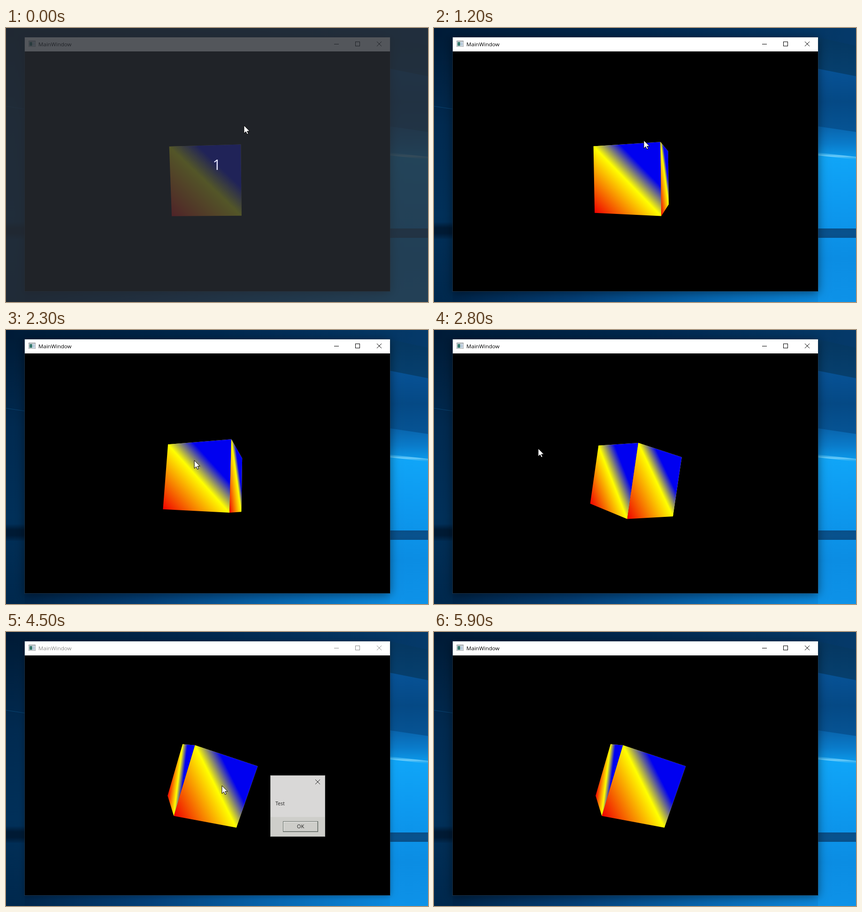
Animation, 899 px wide and 585 px high, one loop 6.2 s. Source, as an HTML page with a canvas:

```html
<!DOCTYPE html>
<html lang="en">
<head>
<meta charset="utf-8">
<title>Rotating cube</title>
<style>
html, body { margin: 0; width: 100%; height: 100%; overflow: hidden; background: #000; }
canvas { display: block; width: 100%; height: 100%; }
</style>
</head>
<body>
<canvas id="stage" width="899" height="585"></canvas>
<script>
const ctx = document.getElementById('stage').getContext('2d');
const W = 899, H = 585, LOOP = 6200, STEP = 100;
const FONT = '"Open Sans", "Noto Sans", sans-serif';

const clamp = v => Math.max(0, Math.min(1, v));
const mix = (a, b, p) => a + (b - a) * p;

// Smooth curve through a few key points that never overshoots them
function curve(keys, t) {
  const last = keys.length - 1;
  const i = Math.max(0, Math.min(last - 1, keys.findIndex(k => k.at > t) - 1));
  if (t >= keys[last].at) return keys[last].to;
  const slope = (j, c) => (keys[j + 1].to[c] - keys[j].to[c]) / (keys[j + 1].at - keys[j].at);
  const tangent = (j, c) => {
    if (j === 0 || j === last) return 0;
    const a = slope(j - 1, c), b = slope(j, c);
    return a * b > 0 ? 2 * a * b / (a + b) : 0;
  };
  const a = keys[i], b = keys[i + 1], d = b.at - a.at, p = (t - a.at) / d, q = 1 - p;
  return a.to.map((v, c) => v * q * q * (1 + 2 * p) + b.to[c] * p * p * (3 - 2 * p)
    + d * p * q * (tangent(i, c) * q - tangent(i + 1, c) * p));
}

// yaw, pitch, roll in degrees
const POSES = [
  { at: 0, to: [-3.2, 4, 1.3] },
  { at: 600, to: [-4, 7.5, .8] },
  { at: 1200, to: [-16, 1, .8] },
  { at: 1800, to: [0, -13.7, 2] },
  { at: 2800, to: [-47.7, .8, -8.3] },
  { at: 3500, to: [-67, 10, -10.7] },
  { at: 3700, to: [-70.2, 7, -17.5] }
];
const POINTER = [
  { at: 0, to: [507, 208] },
  { at: 600, to: [506, 197] },
  { at: 1200, to: [447, 240] },
  { at: 1800, to: [524, 289] },
  { at: 2800, to: [222, 253] },
  { at: 3200, to: [150, 184] },
  { at: 3500, to: [117, 236] },
  { at: 4300, to: [460, 328] },
  { at: 4500, to: [460, 328] },
  { at: 5000, to: [626, 410] }
];

function polygon(points, fill) {
  ctx.beginPath();
  points.forEach(p => ctx.lineTo(p[0], p[1]));
  ctx.closePath();
  ctx.fillStyle = fill;
  ctx.fill();
}

function rect(x, y, w, h, fill) {
  ctx.fillStyle = fill;
  ctx.fillRect(x, y, w, h);
}

function frame(x, y, w, h, color) {
  ctx.strokeStyle = color;
  ctx.lineWidth = 1;
  ctx.strokeRect(x + .5, y + .5, w - 1, h - 1);
}

// Evenly spaced colours from one point to another
function gradient(x0, y0, x1, y1, ...colors) {
  const g = ctx.createLinearGradient(x0, y0, x1, y1);
  colors.forEach((color, i) => g.addColorStop(i / (colors.length - 1), color));
  return g;
}

function line(x0, y0, x1, y1, color) {
  ctx.strokeStyle = color;
  ctx.lineWidth = 1;
  ctx.beginPath();
  ctx.moveTo(x0, y0);
  ctx.lineTo(x1, y1);
  ctx.stroke();
}

function cross(x, y, size, color) {
  line(x, y, x + size, y + size, color);
  line(x + size, y, x, y + size, color);
}

function text(str, x, y, size, color, align = 'left') {
  ctx.font = `${size}px ${FONT}`;
  ctx.textAlign = align;
  ctx.fillStyle = color;
  ctx.fillText(str, x, y);
}

// Slanted band across the right edge of the desktop
function ray(top, bottom, drop, ...colors) {
  polygon([[818, top], [W, top + drop], [W, bottom + drop], [818, bottom]],
    gradient(0, top, 0, bottom + drop, ...colors));
}

function drawWallpaper() {
  rect(0, 0, W, H, gradient(0, 0, W, 0, '#001b37', '#00284f', '#053a6a'));
  rect(0, 20, 40, 565, gradient(0, 20, 0, H, '#001c38', '#012a50', '#013059', '#00284d'));
  ray(20, 90, 18, '#053761', '#06406f');
  ray(87, 212, 16, '#075296', '#054985', '#065596');
  ray(210, 272, 12, '#0964ac', '#0a7bca', '#0ca0f2');
  ray(269, 590, 12, '#10a6f8', '#0d99ef', '#0b8de3', '#0e93e9');
  ray(266, 272, 9, 'rgba(90,205,255,.2)', 'rgba(130,215,252,.8)', 'rgba(60,190,252,.2)');
  ray(428, 448, 0, '#094f88', '#08528e', '#094f88');
  rect(0, 415, 40, 35, gradient(0, 415, 0, 450, '#012d55', '#001a34', '#001a34', '#012a50'));
  line(0, 167, 40, 173, '#0a4472');
  rect(40, 561, 778, 24, gradient(40, 0, 818, 0, '#00254a', '#033f77', '#0664ad', '#0b89de'));
}

function drawWindow(active) {
  ctx.save();
  ctx.shadowColor = active ? 'rgba(0,0,0,.5)' : 'rgba(0,0,0,.35)';
  ctx.shadowBlur = active ? 20 : 12;
  ctx.shadowOffsetY = active ? 3 : 1;
  rect(40, 20, 778, 542, '#000');
  ctx.restore();
  frame(39, 19, 780, 544, 'rgba(50,70,90,.5)');
  rect(40, 50, 778, 512, '#000');
  rect(40, 20, 778, 30, '#fff');

  const ink = active ? '#000' : '#8c8c8c';
  rect(48, 27, 15, 13, '#9aa0a4');
  rect(49, 29, 13, 10, '#eef1f3');
  rect(50, 30, 6, 8, '#39796f');
  rect(57, 30, 4, 8, '#b5c8da');
  text('MainWindow', 69, 39, 11.6, ink);
  line(699, 34.5, 709, 34.5, ink);
  frame(744, 29, 10, 10, ink);
  cross(790, 29, 10, ink);
}

// Right and up axes of the sides that turn into view
const X = [1, 0, 0], Y = [0, 1, 0], Z = [0, 0, 1];
const negate = v => v.map(n => -n);
const SIDES = [[negate(X), Z], [X, Z], [X, Y], [negate(Z), Y]];

function corners([r, u]) {
  const normal = r.map((_, i) => {
    const j = (i + 1) % 3, k = (i + 2) % 3;
    return r[j] * u[k] - r[k] * u[j];
  });
  const at = (a, b) => normal.map((n, i) => n + a * r[i] + b * u[i]);
  return [at(-1, -1), at(-1, 1), at(1, 1), at(1, -1)];
}

function spin(a, b, degrees) {
  const r = degrees * Math.PI / 180, c = Math.cos(r), s = Math.sin(r);
  return [a * c - b * s, a * s + b * c];
}

function project([x, y, z], [yaw, pitch, roll]) {
  [z, x] = spin(z, x, yaw);
  [y, z] = spin(y, z, pitch);
  [x, y] = spin(x, y, roll);
  const scale = 389 / (6.15 - z);
  return [429 + x * scale, 321.7 - y * scale];
}

// Ramp from a corner to the diagonal p-q, holding its first colour up to `hold`
function ramp(corner, p, q, hold, color) {
  const dx = q[0] - p[0], dy = q[1] - p[1];
  const k = ((corner[0] - p[0]) * dx + (corner[1] - p[1]) * dy) / (dx * dx + dy * dy);
  const fx = p[0] + k * dx, fy = p[1] + k * dy;
  return gradient(mix(corner[0], fx, hold), mix(corner[1], fy, hold), fx, fy, color, '#ffff00');
}

function drawCube(pose) {
  for (const side of SIDES) {
    const [a, b, c, d] = corners(side).map(p => project(p, pose));
    const area = (c[0] - a[0]) * (d[1] - b[1]) - (c[1] - a[1]) * (d[0] - b[0]);
    if (area <= 0) continue;
    polygon([a, b, c, d], ramp(a, b, d, 0, '#f00000'));
    polygon([b, c, d], ramp(c, b, d, .6, '#0000f0'));
  }
}

function drawDialog(alpha) {
  ctx.save();
  ctx.globalAlpha = alpha;
  rect(563, 306, 117, 89, '#fdfcfb');
  rect(563, 395, 117, 42, '#f0f0ec');
  frame(563, 306, 117, 131, '#a0a4a0');
  cross(659, 315, 10, '#000');
  text('Test', 574, 370, 10.5, '#000');
  frame(590, 404, 75, 23, '#4c544f');
  frame(591, 405, 73, 21, '#8d938f');
  line(591, 405.5, 663, 405.5, '#fff');
  line(591.5, 405, 591.5, 425, '#fff');
  text('OK', 627.5, 419, 11, '#000', 'center');
  ctx.restore();
}

function drawPointer([x, y]) {
  const shape = [[0, 0], [0, 17], [4, 13.3], [6.7, 19], [9.3, 17.8], [6.7, 12.3], [12, 12.3]];
  polygon(shape.map(p => [x + p[0], y + p[1]]), '#fff');
  ctx.strokeStyle = '#000';
  ctx.lineWidth = 1;
  ctx.stroke();
}

function draw(t) {
  drawWallpaper();
  drawWindow(t < 4300 || t >= 5500);
  drawCube(curve(POSES, t));
  drawDialog(clamp((t - 4200) / 350) * clamp((5750 - t) / 350));
  if (t < 200) {
    rect(0, 0, W, H, 'rgba(40,44,50,.8)');
    text('1', 449, 303, 31, '#e6e6ff', 'center');
  }
  if (t < 5900) drawPointer(curve(POINTER, t));
}

const start = performance.now();
let shown = -1;
function tick() {
  const t = Math.floor((performance.now() - start) % LOOP / STEP) * STEP;
  if (t !== shown) draw(shown = t);
  requestAnimationFrame(tick);
}
tick();
</script>
</body>
</html>
```
